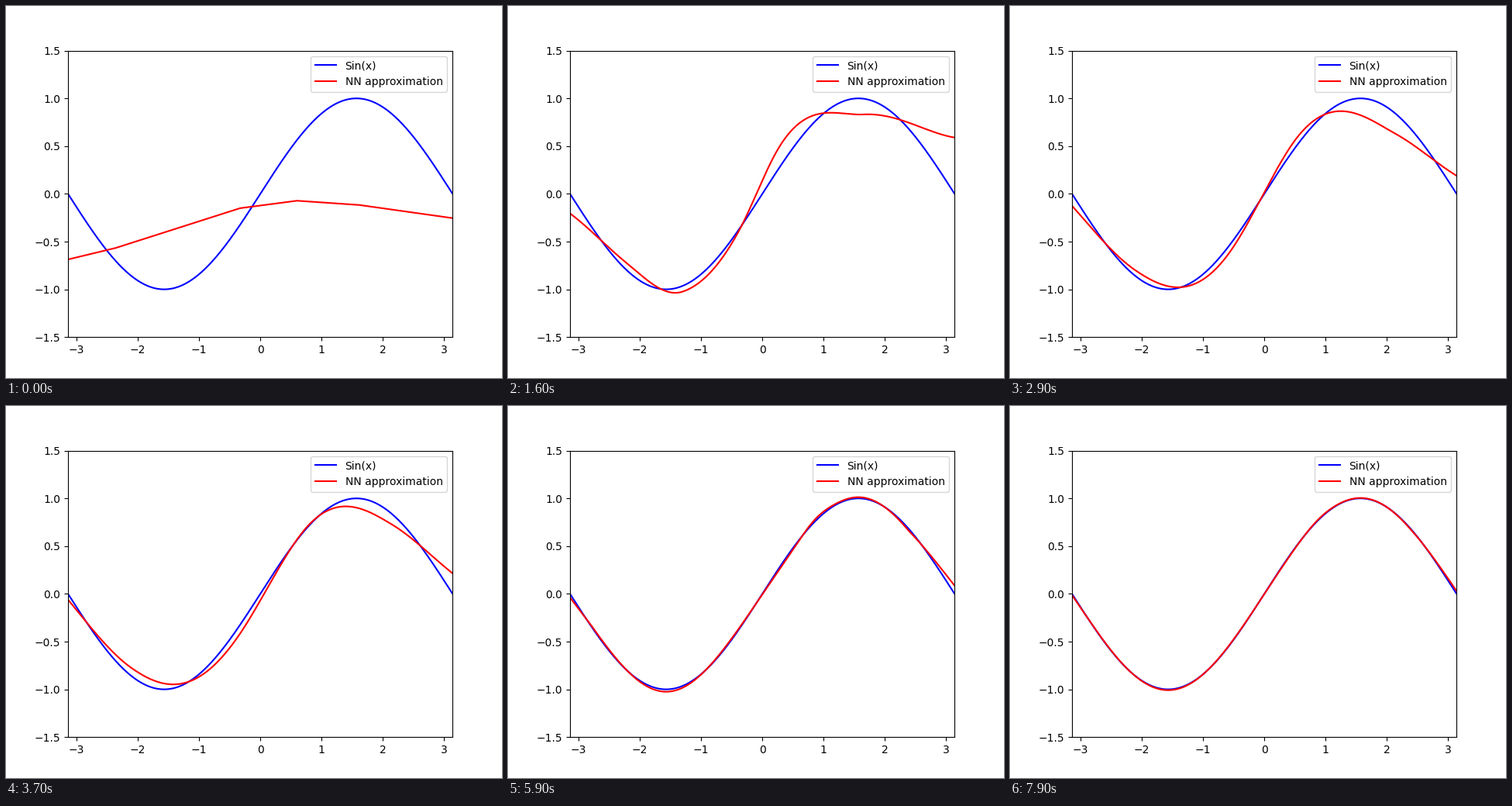
Write a matplotlib script that moves like this. It is 640 by 480 pixels and loops after 8 s.

```python
import numpy as np
import matplotlib.pyplot as plt
from matplotlib.animation import FuncAnimation

FRAMES, STEP = 80, 100  # count, ms
PI = np.pi
x = np.arange(-PI, PI, 0.01)
sine = np.sin(x)


def curve(*points):
    """Smooth cubic curve over x through a few points."""
    kx, ky = np.array(points).T
    slope = np.gradient(ky, kx, edge_order=2)
    i = np.clip(np.searchsorted(kx, x, side="right") - 1, 0, len(kx) - 2)
    h = kx[i + 1] - kx[i]
    u = (x - kx[i]) / h
    return ((1 + 2 * u) * (1 - u) ** 2 * ky[i]
            + u * (1 - u) ** 2 * h * slope[i]
            + u ** 2 * (3 - 2 * u) * ky[i + 1]
            + u ** 2 * (u - 1) * h * slope[i + 1])


def hinge(v):
    return np.maximum(v, 0)


def late(ms):
    """Sine plus a ripple and two loose ends that die away."""
    fade = np.exp((5000 - ms) / 1900)
    ripple = 0.06 * np.exp(-((x - 0.85) / 0.3) ** 2) - 0.03 * np.sin(3 * x)
    ends = 0.2 * hinge(x - 2.4) - 0.15 * hinge(-2.8 - x)
    return sine + fade * (ripple + ends - 0.01)


# Untrained: straight pieces
start = np.interp(x, [-PI, -2.37, -0.33, 0.6, 1.6, PI],
                  [-0.687, -0.568, -0.15, -0.072, -0.115, -0.254])

# Partly trained: sine plus the turning points of the remaining error
rough = sine + curve((-PI, -0.205), (-2.2, 0.075), (-1.3, -0.06),
                     (-0.4, -0.02), (0.22, 0.21), (1.65, -0.165), (PI, 0.59))
bent = sine + curve((-PI, -0.125), (-2.1, 0.06), (-0.55, -0.075),
                    (0.45, 0.08), (2.15, -0.21), (PI, 0.19))
close = sine + curve((-PI, -0.06), (-2.1, 0.085), (-0.25, -0.09),
                     (0.7, 0.01), (2.15, -0.11), (PI, 0.215))

STAGES = {
    0: start,
    400: 0.15 + 0.43 * x,
    900: rough + 0.015 * x * abs(x),
    1600: rough,
    2300: 1.09 * (rough + bent) / 2,
    2900: bent,
    3700: close,
    4300: late(4300),
}
TIMES = list(STAGES)


def learned(ms):
    if ms >= TIMES[-1]:
        return late(ms)
    i = np.searchsorted(TIMES, ms, side="right") - 1
    a, b = TIMES[i], TIMES[i + 1]
    u = (ms - a) / (b - a)
    return (1 - u) * STAGES[a] + u * STAGES[b]


fig, ax = plt.subplots(figsize=(6.4, 4.8), dpi=100)
ax.plot(x, sine, color="blue", label="Sin(x)")
fit, = ax.plot(x, learned(0), color="red", label="NN approximation")
ax.set_xlim(x[0], x[-1])
ax.set_ylim(-1.5, 1.5)
ax.legend(loc="upper right")


def update(frame):
    fit.set_ydata(learned(frame * STEP))
    return fit,


anim = FuncAnimation(fig, update, frames=FRAMES, interval=STEP,
                     repeat=True, repeat_delay=0)
plt.show()
```
